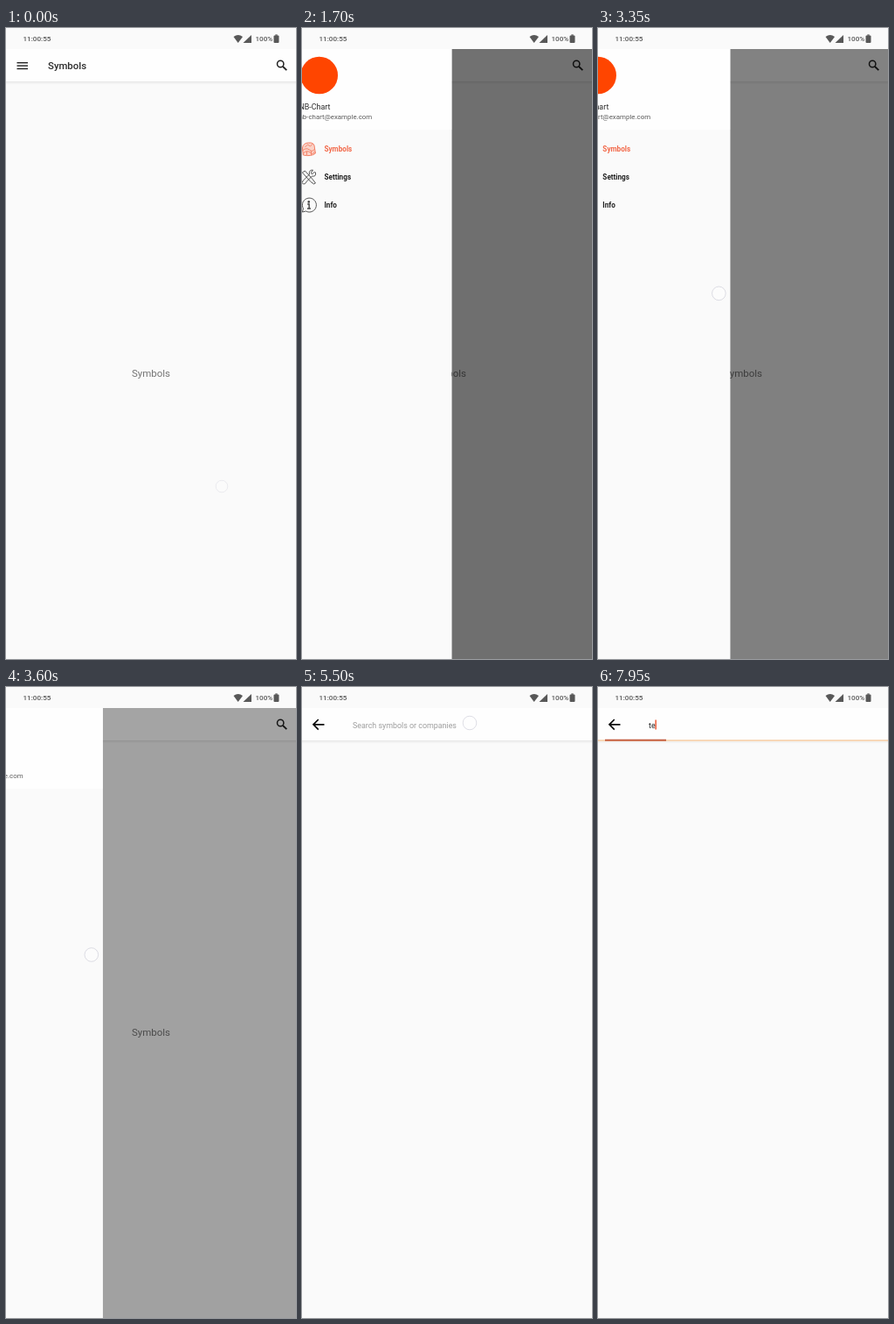
Animation of 332 by 720 pixels, one loop 8 s. Source, as an HTML page with a canvas:

```html
<!DOCTYPE html>
<html lang="en">
<head>
<meta charset="utf-8">
<title>Symbol search</title>
<style>
html, body { margin: 0; width: 100%; height: 100%; overflow: hidden; background: #fafafa; }
canvas { display: block; width: 332px; height: 720px; }
</style>
</head>
<body>
<canvas id="stage"></canvas>
<script>
const W = 332, H = 720, LOOP = 8000, DRAWER = 186, KEYS_TOP = 496;
const PAGE = '#fafafa', BAR = '#fefefe', INK = '#212121', ORANGE = '#ff4500';
const canvas = document.getElementById('stage');
const ctx = canvas.getContext('2d');
const dpr = window.devicePixelRatio || 1;
canvas.width = W * dpr;
canvas.height = H * dpr;

const clamp = v => Math.max(0, Math.min(1, v));
const ramp = (t, from, to) => clamp((t - from) / (to - from));
const easeOut = (u, power) => 1 - (1 - u) ** power;
const within = (t, from, to) => t >= from && t < to;

function rect(x, y, w, h, color) {
  ctx.fillStyle = color;
  ctx.fillRect(x, y, w, h);
}

function pill(x, y, w, h, r, color) {
  ctx.fillStyle = color;
  ctx.beginPath();
  ctx.roundRect(x, y, w, h, r);
  ctx.fill();
}

function disc(x, y, r, color) {
  ctx.fillStyle = color;
  ctx.beginPath();
  ctx.arc(x, y, r, 0, Math.PI * 2);
  ctx.fill();
}

function ring(x, y, r, color, width = 1) {
  ctx.strokeStyle = color;
  ctx.lineWidth = width;
  ctx.beginPath();
  ctx.arc(x, y, r, 0, Math.PI * 2);
  ctx.stroke();
}

function stroke(d, color, width = 1) {
  ctx.strokeStyle = color;
  ctx.lineWidth = width;
  ctx.stroke(new Path2D(d));
}

function fill(d, color) {
  ctx.fillStyle = color;
  ctx.fill(new Path2D(d));
}

function text(s, x, y, size, color, weight = 400, align = 'left') {
  ctx.font = `${weight} ${size}px Roboto, sans-serif`;
  ctx.textAlign = align;
  ctx.fillStyle = color;
  ctx.fillText(s, x, y);
}

function faded(alpha, draw) {
  if (alpha <= 0) return;
  ctx.save();
  ctx.globalAlpha *= alpha;
  draw();
  ctx.restore();
}

function shifted(x, y, draw) {
  ctx.save();
  ctx.translate(x, y);
  draw();
  ctx.restore();
}

function statusBar() {
  const c = '#585858';
  rect(0, 0, W, 24, PAGE);
  text('11:00:55', 19.5, 15, 8.1, c, 500);
  fill('M260.5 10Q265.7 6 271 10L265.7 17Z', c);
  fill('M281 8V17H271.5Z', c);
  text('100%', 285.5, 15, 8.1, c, 500);
  pill(306.5, 8.5, 6, 8.5, 1, c);
  rect(308.3, 7.4, 2.4, 1.4, c);
}

function searchIcon() {
  ring(314.2, 41, 3.7, INK, 1.5);
  stroke('M317 44L321.3 48.2', INK, 1.8);
}

function cursorOn(t) {
  return within(t, 4750, 5250) || within(t, 5700, 6225) ||
    within(t, 6640, 7450) || t >= 7930;
}

function page(t) {
  const search = ramp(t, 4650, 4930);
  const typed = t < 6640 ? '' : t < 6950 ? 't' : 'te';
  rect(0, 24, W, H - 24, PAGE);
  rect(0, 24, W, 37, BAR);
  rect(0, 61, W, 1.2, '#e6e6e6');
  rect(0, 62.2, W, 1.6, '#f2f2f2');

  faded(1 - search, () => {
    for (const y of [39, 42.4, 45.8]) rect(12.5, y, 12.5, 1.4, INK);
    text('Symbols', 48, 47.3, 11.4, '#2c2c2c', 500);
    searchIcon();
    text('Symbols', 166, 398, 11.5, '#757575', 400, 'center');
  });

  faded(search, () => {
    stroke('M25.5 42.8H13.2M18.8 37L13 42.8L18.8 48.6', '#0c0c0c', 1.7);
    if (typed) text(typed, 58, 46.8, 8.9, INK);
    else text('Search symbols or companies', 58, 46.8, 8.9, '#9e9e9e');
    if (cursorOn(t)) {
      const x = 58 + ctx.measureText(typed).width;
      rect(x - (typed ? 0.2 : 0), 37.5, 1.5, 11, '#ee5a36');
    }
  });

  if (t >= 7700) {
    const u = ramp(t, 7700, 7950);
    const left = 8 * u * u, right = 78 * u ** 1.5;
    rect(0, 60, W, 2, '#f8d8b8');
    rect(left, 59.7, right - left, 1.9, '#c25a3c');
  }
}

function drawerEdge(t) {
  if (t < 2900) return DRAWER * easeOut(ramp(t, 1469, 2050), 5);
  const dragged = time => DRAWER - 75 * Math.max(0, (time - 2950) / 650) ** 1.6;
  if (t < 3700) return dragged(t);
  return dragged(3700) * (1 - easeOut(ramp(t, 3700, 4000), 3));
}

function menuIcons() {
  const pink = '#f27d62', dark = '#444444';
  // coins and a small chart
  fill('M15 137Q16 131 22 131Q29 130 29 137L30 143Q25 147 16 145Z', '#fbd3c8');
  stroke('M15 137Q16 131 22 131Q29 130 29 137L30 143Q25 147 16 145Z', pink, 1);
  stroke('M15 140Q19 136 23 139T29 138M16 143Q20 139 24 142T29 141M18 136L21 133L24 135L27 132M20 145V141M25 145V140', pink, 0.9);
  // wrench and screwdriver
  stroke('M16 164L18 163L27 173L30 177L28 178L24 175L15 165Z', dark, 0.9);
  stroke('M29 164L26 167L25 165L27 162Q22 162 23 167L16 174Q13 177 16 178Q18 179 20 175L26 169Q31 170 30 165Z', dark, 0.9);
  // speech bubble
  stroke('M15 210L16 206A8 8 0 1 1 19 209Z', dark, 0.9);
  disc(22.3, 198.4, 1.3, dark);
  stroke('M20.8 201H22.7V206M20.5 206H24.5', dark, 1.4);
}

function drawer(t) {
  const edge = drawerEdge(t), open = edge / DRAWER;
  if (edge < 0.3) return;
  rect(edge, 24, W - edge, H - 24, `rgba(0,0,0,${0.6 * open})`);

  ctx.save();
  ctx.beginPath();
  ctx.rect(0, 24, edge, H - 24);
  ctx.clip();
  ctx.translate(edge - DRAWER, 0);
  rect(0, 24, DRAWER, H - 24, PAGE);
  rect(0, 24, DRAWER, 92, BAR);
  disc(34.3, 54, 21.3, ORANGE);
  text('NB-Chart', 11, 93, 8.9, '#2a2a2a');
  text('nb-chart@example.com', 11, 104, 7.9, '#5c5c5c');
  menuIcons();
  text('Symbols', 40, 141.3, 8.2, '#f2694a', 700);
  text('Settings', 40, 173.3, 8.2, INK, 700);
  text('Info', 40, 205.3, 8.2, INK, 700);
  ctx.restore();
}

function keyRow(keys, x, y, hints = '') {
  [...keys].forEach((key, i) => {
    const cx = x + i * 32.85;
    text(key, cx, y, 15, '#f3f4f5', 400, 'center');
    if (hints) text(hints[i], cx + 11, y - 9.5, 5.5, '#a0a4a7', 400, 'center');
  });
}

function suggestions(t) {
  const words = t < 6640 ? [] : t < 6950 ? ['t', 'thank', 'the'] : ['te', 'test', 'tell'];
  words.forEach((word, i) => text(word, 70 + i * 95.5, 515, 12, '#cfd2d4', 400, 'center'));
  if (words.length) {
    rect(115, 503, 1, 15, '#41474b');
    rect(213, 503, 1, 15, '#41474b');
  }
}

function keyboard(t) {
  const shown = easeOut(ramp(t, 5640, 5960), 2.5) - ramp(t, 7500, 7780) ** 1.5;
  if (shown <= 0) return;
  const soft = '#d0d3d5', mic = '#aeb2b5';
  shifted(0, (H - KEYS_TOP) * (1 - shown), () => {
    rect(0, KEYS_TOP, W, H - KEYS_TOP, '#32383c');
    rect(0, KEYS_TOP, W, 29, '#292e32');
    disc(16.5, 510.5, 10, '#ffffff');
    stroke('M14.8 506.5L18.8 510.5L14.8 514.5', '#32383c', 1.4);
    suggestions(t);
    pill(316.8, 504, 4, 8, 2, mic);
    stroke('M314.5 510Q314.5 514 318.8 514T323 510M318.8 514V517.5', mic, 1.1);

    keyRow('1234567890', 18, 547);
    keyRow('qwertyuiop', 18, 576, '%\\|=[]<>{}');
    keyRow('asdfghjkl', 34, 607, '@#$_&-+()');
    keyRow('zxcvbnm', 66.8, 639, '*"\':;!?');
    stroke('M26 628.5L19.8 635H23V640H29V635H32.2Z', soft, 1.1);
    stroke('M303 629.5H313V640H303L298.5 634.8ZM304.5 632L309.5 637.5M309.5 632L304.5 637.5', soft, 1.1);

    text('?123', 25.5, 669, 10, soft, 400, 'center');
    ring(66.5, 660, 3.3, soft, 0.8);
    stroke('M64.8 661Q66.5 663 68.2 661M65.2 658.8V659.5M67.8 658.8V659.5', soft, 0.7);
    text(',', 66.5, 671, 13, soft, 400, 'center');
    ring(99.3, 665.5, 5.3, soft, 0.9);
    stroke('M94 663.6H104.6M94 667.4H104.6M99.3 660.2Q94.5 665.5 99.3 670.8Q104 665.5 99.3 660.2', soft, 0.8);
    pill(123, 658, 118.5, 17, 2, '#5c6164');
    text('English', 182, 669.3, 7.4, '#eceeef', 400, 'center');
    text('.', 264.5, 670, 14, soft, 400, 'center');
    pill(289, 656, 33.5, 21.5, 4, '#5e97f6');
    stroke('M311.5 663V667H300M303.5 663.3L299.8 667L303.5 670.7', '#ffffff', 1.4);
  });
}

function touch(x, y, alpha = 1, r = 7.8) {
  faded(alpha, () => {
    disc(x, y, r, 'rgba(255,255,255,0.38)');
    ring(x, y, r, 'rgba(165,165,185,0.45)', 0.8);
  });
}

// start, end, x, y
const TAPS = [
  [1400, 1650, 17, 45.5],
  [4600, 4780, 315, 43],
  [5450, 5620, 192, 41],
  [6600, 6830, 152.5, 575],
  [6900, 7140, 84, 573],
  [7450, 7600, 306, 667]
];

function touches(t) {
  if (t < 100) touch(247, 523, 0.5 * (1 - t / 100), 6.8);
  for (const [from, to, x, y] of TAPS) {
    if (within(t, from, to)) touch(x, y, 1 - ramp(t, to - 70, to));
  }
  if (within(t, 2900, 3720)) {
    touch(drawerEdge(t) - 13, 298 + 7.5 * ramp(t, 2900, 3600), 1 - ramp(t, 3660, 3720));
  }
}

const start = performance.now();

function frame(now) {
  const t = Math.max(0, now - start) % LOOP;
  ctx.setTransform(dpr, 0, 0, dpr, 0, 0);
  page(t);
  drawer(t);
  statusBar();
  keyboard(t);
  touches(t);
  requestAnimationFrame(frame);
}
requestAnimationFrame(frame);
</script>
</body>
</html>
```
